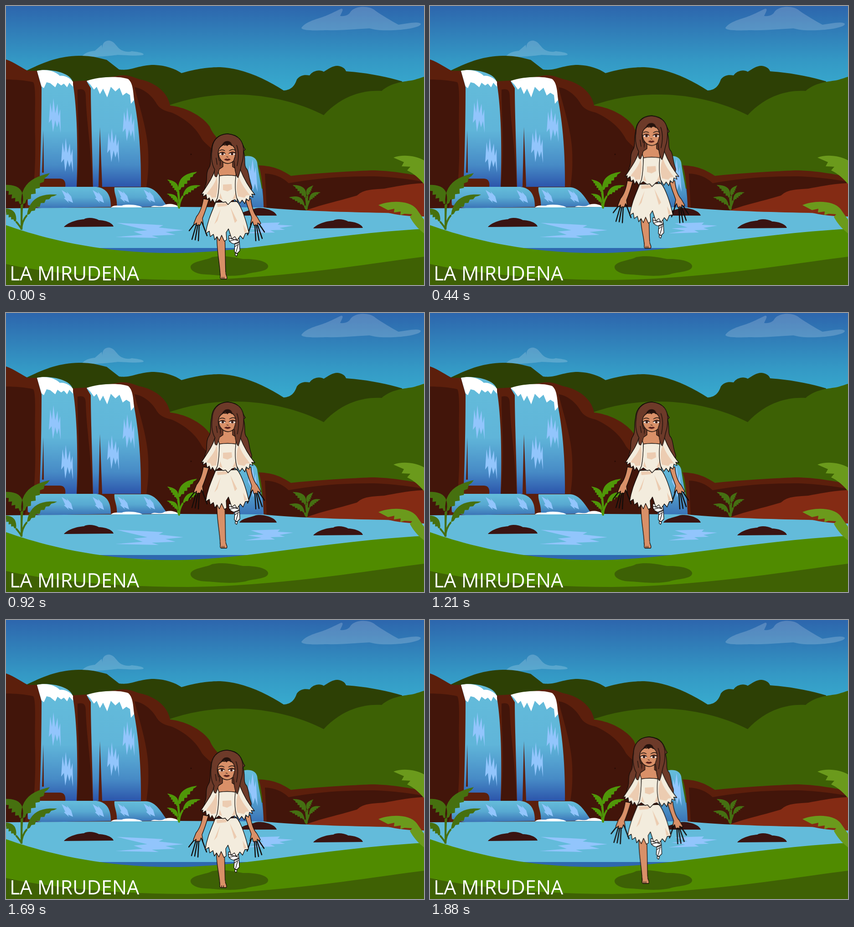
Recreate the animation shown at these times as an HTML page. Size 917 px wide and 611 px high, loop 1.92 s.

```html
<!DOCTYPE html>
<html lang="es">
<head>
<meta charset="utf-8">
<title>La Mirudena</title>
<style>
html, body { margin: 0; width: 100%; height: 100%; overflow: hidden; background: #2e68ae; }
svg { display: block; width: 100vw; height: 100vh; }
.brown { fill: #5c1f0c; }
.dark { fill: #42150a; }
.foam { fill: #fff; }
.glint { fill: #92c5fc; }
.stone { fill: #3a1412; }
.ink { stroke: #130d0a; stroke-width: 1.3; stroke-linejoin: round; stroke-linecap: round; }
.skin { fill: #d99068; }
.hair { fill: #6d3a29; }
.cloth { fill: #f3ecdd; }
.fold { fill: #ecccb1; }
.line { fill: none; }
.title { font: 43px "Open Sans", sans-serif; fill: #fff; }
</style>
</head>
<body>
<svg viewBox="0 0 917 611" preserveAspectRatio="none">
  <defs>
    <linearGradient id="sky" x2="0" y2="1">
      <stop stop-color="#2d66ad"/><stop offset=".55" stop-color="#3499c5"/><stop offset="1" stop-color="#3ab4d3"/>
    </linearGradient>
    <linearGradient id="fall" gradientUnits="userSpaceOnUse" x1="0" y1="170" x2="0" y2="398">
      <stop stop-color="#63bbda"/><stop offset=".45" stop-color="#60b5d9"/><stop offset=".78" stop-color="#478bc6"/><stop offset="1" stop-color="#2b53aa"/>
    </linearGradient>
    <linearGradient id="pool" x2="0" y2="1">
      <stop stop-color="#65bddb"/><stop offset=".5" stop-color="#58a9d1"/><stop offset="1" stop-color="#3a73b7"/>
    </linearGradient>
    <path id="streak" d="M0 54L3 9 7 32 10 0 14 33 19 12 21 39 25 24 26 76 22 50 18 64 14 48 9 74 6 46Z"/>
    <path id="splash" d="M0 0L13 8 11 3 21 14 25 28 14 23 16 28 5 18 8 17Z"/>
    <path id="boulder" d="M127 484C134 475 154 468 171 467 179 462 194 464 204 469 216 469 233 474 236 483Z"/>
  </defs>

  <rect width="917" height="220" fill="url(#sky)"/>
  <g fill="#fff" fill-opacity=".19">
    <path d="M648 48C656 36 676 30 692 25 708 20 728 9 735 6 743 5 735 16 733 22 745 23 752 19 755 14 764-1 797-2 810 10 824 20 846 33 861 41 880 38 905 33 910 39 911 46 880 52 850 53 820 54 815 53 797 49 770 50 740 54 700 53 675 54 650 54 648 48Z"/>
    <path d="M166 111C173 102 184 99 195 98L210 85 212 95C209 80 220 74 228 76 240 79 242 90 252 96 262 101 270 101 276 99 285 100 301 102 302 106 300 110 270 108 245 107 225 110 180 113 166 111Z"/>
  </g>

  <path fill="#2d4005" d="M46 141C90 120 118 110 160 109 190 109 205 114 221 118L248 139C275 143 290 129 325 129 350 130 370 137 385 147 420 137 445 134 470 134 520 136 570 160 609 185 628 184 634 172 638 161 645 151 656 150 666 152 672 142 688 138 697 144 707 138 716 131 727 131 738 132 744 137 746 143 790 146 835 155 869 165V260H46Z"/>
  <path fill="#3d6105" d="M350 220C400 202 450 194 495 194 570 193 640 210 697 239 730 203 775 183 824 186 845 168 870 166 890 163 900 161 910 157 917 155V400H350Z"/>

  <path class="brown" d="M0 117C20 124 35 136 48 142H70L147 165 180 163 245 153C270 148 285 160 300 162 330 170 355 190 360 218 395 222 430 240 447 264 455 285 475 303 515 330L570 445H0Z"/>
  <path class="dark" d="M0 161C20 161 45 163 60 167 67 180 62 230 64 290 65 330 63 360 62 379L110 379 130 397 55 398 40 445H0ZM157 183C170 181 175 183 175 200 178 270 186 300 190 396H155C165 300 156 240 157 183ZM282 178C300 180 320 195 331 215 340 228 352 230 365 234 400 250 420 272 430 292 442 307 460 318 475 330L560 442H340C333 420 325 400 308 396 312 370 313 350 312 320 310 270 291 215 282 178Z"/>
  <path class="brown" d="M74 379H118C128 379 133 389 128 397H58ZM213 394C230 390 241 398 236 409L243 440H226Z"/>
  <circle cx="406" cy="325" r="1.4" fill="#250b05"/>

  <path fill="url(#fall)" d="M68 142C95 136 140 145 146 165 156 220 158 310 155 396H130C132 382 125 378 118 378H74C77 300 78 230 78 178ZM177 165C200 155 265 150 277 185 287 230 297 300 296 396H191C190 340 186 230 186 180Z"/>
  <path class="brown" d="M82 272L83 365 79 365ZM206 265L211 396H203Z"/>
  <path class="foam" d="M68 142C90 137 108 143 118 153 130 151 143 160 147 166L147 177 139 168 134 178 127 170 121 174 113 168 108 178 97 169 89 167 83 180 78 176ZM177 164C205 154 250 153 268 160 278 168 279 185 281 206L274 214 272 195 264 190 256 196 249 179 240 187 230 177 222 200 213 181 206 193 199 177 193 183 185 172Z"/>
  <g class="glint">
    <use href="#streak" x="94" y="202"/><use href="#streak" x="121" y="289"/>
    <use href="#streak" x="222" y="268"/><use href="#streak" x="256" y="222"/>
  </g>
  <path fill="url(#pool)" d="M60 396H198C222 399 230 415 230 440L78 443 48 436C46 415 52 400 60 396Z"/>
  <path fill="url(#pool)" d="M238 397H308C330 399 340 420 354 439L243 441C245 420 236 410 238 397Z"/>
  <g class="glint">
    <use href="#splash" x="122" y="403"/><use href="#splash" x="190" y="403"/>
    <use href="#splash" x="245" y="402"/><use href="#splash" x="302" y="402"/>
  </g>

  <path fill="url(#pool)" d="M500 343C510 328 545 320 551 342 556 380 566 415 566 442H500Z"/>
  <path class="glint" d="M531 370L534 348 537 362 541 335 545 366 548 352 552 407 546 389 542 404 537 381Z"/>
  <path class="brown" d="M554 349C580 350 600 355 625 372 690 365 760 362 800 360 850 360 890 370 917 373V455H566C564 410 562 370 554 349Z"/>
  <path class="dark" d="M568 367C590 368 605 374 620 388 680 377 740 373 800 373 840 373 890 380 917 385V430L660 449 572 445Z"/>
  <path fill="#842b14" d="M655 449C690 435 720 430 770 415 780 407 785 402 830 400 870 392 900 388 917 388V459L820 455Z"/>
  <path fill="#63bbda" d="M0 443L380 440 565 441C610 447 720 451 830 453L917 456V530H0Z"/>
  <path fill="#842b14" d="M835 452Q875 448 917 450V461Q870 461 835 452Z"/>
  <path class="foam" d="M230 441C240 433 250 440 257 436 273 433 295 437 299 441ZM318 440C327 434 335 441 345 437 352 433 366 431 380 440Z"/>
  <path class="glint" d="M243 475L310 478 345 480 335 485 389 491 350 495 372 501 320 503 335 508 240 506 300 501 280 494 310 491ZM537 476L601 474 596 479 630 481 600 486 612 490 580 491 590 496 523 498 560 492 530 487 565 485Z"/>
  <g class="stone">
    <use href="#boulder"/><use href="#boulder" x="547" y="3"/>
    <path d="M512 459C516 450 538 447 548 443 560 440 590 446 594 459Z"/>
  </g>

  <path fill="#508b00" d="M0 480C100 515 220 541 365 541 520 541 680 502 917 488V611H0Z"/>
  <path fill="#3f6104" d="M0 565C100 587 250 600 400 600 600 598 790 565 917 549V611H0Z"/>
  <path fill="#3d6105" d="M405 570C410 558 440 557 452 550 475 545 500 550 520 554 550 553 577 560 575 571 573 583 540 582 525 588 490 594 465 589 440 588 420 588 403 580 405 570Z"/>
  <g id="plants"></g>
  <g fill="#6b9a1c">
    <path d="M850 332C870 324 900 328 917 338V390C906 377 895 367 880 360L887 352 868 351 873 342Z"/>
    <path d="M817 436C840 426 885 424 901 445L917 468V498C904 488 893 475 886 462L891 456 874 455 865 458 866 450 851 452 852 444 838 447Z"/>
  </g>

  <g id="body">
    <path class="hair ink" d="M487 280C466 280 452 294 451 314 447 330 451 345 446 353 436 368 444 381 437 394 435 402 440 407 444 408H528C538 406 541 401 538 393 533 380 534 368 529 358 520 350 527 335 521 318L525 314C518 308 520 283 487 280Z"/>
    <g id="leg"><path class="skin ink" d="M463 500C461 530 468 555 470 589H482C481 560 481 530 480 500Z"/></g>
    <g id="foot">
      <path class="skin ink" d="M470 586C471 591 468 597 472 598H484C487 595 483 590 482 586"/>
      <path class="skin" d="M470.700 583H481.500V589H470.700Z"/>
      <path class="ink line" d="M474 597V594M478 597V594"/>
    </g>
    <path class="foam ink" d="M489 503L510 503 512 515C509 522 500 522 495 519 489 516 488 510 489 503ZM502 520L512 516 513 536 507 542 501 538ZM503 541L508 543 506 548 503 546Z"/>
    <path class="ink line" d="M489 508L510 514M490 515L511 509M502 527L511 521M505 538L509 524"/>

    <path class="ink line" stroke-width="2" d="M416 474L402 492M418 477L408 511M421 478L415 512M424 478L422 514M429 471L441 503M553 474L567 495M551 477L562 509M549 478L555 513M546 478L548 514M540 472L530 501" style="stroke-width:2.4"/>
    <path class="skin ink" d="M433 422C430 442 424 454 418 461L412 476 414 479 418 475 418 481 422 479 426 480 429 472 433 479 431 465C436 453 441 438 445 424ZM526 426C531 444 536 454 539 464L536 479 541 472 544 481 548 479 552 481 552 475 557 478 559 476 551 462C545 456 539 442 537 422Z"/>

    <path class="skin ink" d="M476 340V352L464 360V374H507V358L497 352V340Z"/>
    <path class="cloth ink" d="M460 430C452 450 442 470 438 498L446 493 448 505 455 500 458 512 463 505 468 514 473 502 479 515 484 512 483 496 488 488 492 500 495 510 502 505 507 513 514 503 520 510 525 498 533 497C527 470 517 440 507 428Z"/>
    <path class="fold" d="M463 433L488 431 484 438 464 440ZM471 444L457 478 464 470ZM492 440L507 470 502 475ZM520 478L529 494 523 496Z"/>
    <path class="cloth ink" d="M468 372Q486 369 505 372C508 390 503 405 508 430L502 424 496 426 487 435 482 429 476 430 468 424 460 430C467 410 467 390 468 372Z"/>
    <path class="fold" d="M476 391L495 390 496 401 486 406 476 403ZM470 410L475 424 468 421ZM504 407L505 422 497 423Z"/>
    <path class="cloth ink" d="M458 359C453 377 443 390 428 413L433 411 432 418 439 413 441 424 446 420 449 430 453 423 458 432 464 420C468 400 468 380 468 371L463 356ZM506 354L514 358C521 376 531 395 546 413L539 412 542 419 535 416 533 427 527 422 524 433 518 425 513 432 506 420C501 400 503 380 506 354Z"/>
    <path class="fold" d="M462 374C459 391 445 403 440 412L448 414 451 420 461 419C465 399 465 386 462 374ZM511 373C515 389 526 402 535 414L527 415 523 420 509 417C504 401 506 385 511 373Z"/>

    <g id="head">
      <path class="hair ink" d="M486 280C463 281 452 297 452 317 449 334 453 350 458 358 455 369 459 375 462 374 468 360 471 345 470 335L500 338C502 355 503 371 509 376 514 364 515 350 518 342 522 330 520 321 521 317 521 300 515 283 486 280Z"/>
      <ellipse class="skin ink" cx="463" cy="325" rx="3" ry="6"/>
      <path class="skin ink" d="M466 322C464 312 472 307 477 304 482 307 489 301 493 304 501 307 506 315 505 327 503 337 496 345 486 345 475 344 467 335 466 322Z"/>
      <path fill="#25120d" d="M473 306C476 298 482 295 488 296 493 297 497 302 495 307L490 302 485 307 481 302Z"/>
      <path class="hair" d="M479 302C464 308 463 324 468 339L470 353 463 366 458 348 459 315ZM493 302C505 310 506 322 500 337L504 354 509 369 515 340 513 310Z"/>
      <path class="ink line" d="M478 303C462 310 464 326 468 339M494 303C505 311 506 322 500 337M461 333L463 347M506 305Q513 322 507 350"/>
      <path fill="#9c5339" d="M468 322Q474 316 481 321L480 325H468ZM489 322Q497 315 503 321L502 325H490Z"/>
      <path fill="#fff" d="M468 324Q474 319 481 324 475 330 468 324ZM489 324Q496 319 503 324 496 330 489 324Z"/>
      <g fill="#3a1b14"><circle cx="475" cy="324" r="2.800"/><circle cx="496" cy="324" r="2.800"/></g>
      <path class="ink line" d="M467 323Q474 318 481 323M489 323Q496 318 504 322M468 317Q474 313 480 317M490 317Q497 312 503 316M484 330L487 331"/>
      <path fill="#5a211c" d="M478 336L483 334 486 335 489 334 493 336Q486 342 478 336Z"/>
    </g>
  </g>

  <text class="title" x="8" y="601">LA MIRUDENA</text>
</svg>
<script>
// A leaf follows a bent midrib; its lower edge is torn into teeth.
function leafPath([x0, y0, x1, y1, bend, width]) {
  const dx = x1 - x0, dy = y1 - y0, len = Math.hypot(dx, dy);
  const nx = -dy / len, ny = dx / len, steps = 12, top = [], bottom = [];
  for (let i = 0; i <= steps; i++) {
    const t = i / steps, arch = 4 * bend * t * (1 - t);
    const half = width * Math.sin(Math.PI * Math.pow(t, 0.8));
    const at = d => `${(x0 + dx * t + nx * d).toFixed(1)} ${(y0 + dy * t + ny * d).toFixed(1)}`;
    const side = Math.sign(bend);
    top.push(at(arch + side * half));
    bottom.unshift(at(arch - side * half * (i % 2 ? 1.15 : 0.6)));
  }
  return `M${top.concat(bottom).join("L")}Z`;
}

function plant(color, x, y, leaves) {
  const stems = leaves.map(([lx, ly]) => `M${x} ${y}Q${x} ${ly + 14} ${lx} ${ly}`).join("");
  return `<path d="${stems}" fill="none" stroke="${color}" stroke-width="4"/>` +
    `<path d="${leaves.map(leafPath).join("")}" fill="${color}"/>`;
}

document.getElementById("plants").innerHTML =
  plant("#46700f", 34, 490, [[34, 435, 96, 366, -8, 13], [36, 434, -10, 392, 8, 13], [46, 458, 112, 413, -10, 9], [22, 472, -12, 444, 6, 8]]) +
  plant("#4f9708", 380, 440, [[378, 404, 419, 363, -6, 8], [377, 408, 354, 380, 4, 6], [388, 416, 427, 393, -5, 6], [377, 432, 353, 411, 4, 5]]) +
  plant("#456f12", 660, 440, [[658, 420, 629, 392, 5, 7], [665, 426, 690, 408, -4, 5], [655, 437, 621, 419, 5, 6], [661, 416, 674, 393, -3, 5]]);

// start ms, body x, body y, head x, leg stretch
const poses = [
  [0, 0, 0, 0, 0],
  [440, 0, -39.5, 0, -28],
  [920, 0, -85, 0.5, 2],
  [1400, -1, 5, -0.5, -17],
  [1880, -4.5, -24, -1, 3],
];
const loop = 1920, hip = 505, legLength = 83;

function hold(id, toTransform) {
  const frames = poses.map(([start, ...pose]) =>
    ({ offset: start / loop, transform: toTransform(...pose), easing: "step-end" }));
  frames.push({ ...frames[frames.length - 1], offset: 1 });
  document.getElementById(id).animate(frames, { duration: loop, iterations: Infinity });
}

hold("body", (x, y) => `translate(${x}px, ${y}px)`);
hold("head", (x, y, headX) => `translate(${headX}px, 0px)`);
hold("leg", (x, y, headX, stretch) =>
  `translate(0px, ${hip}px) scale(1, ${1 + stretch / legLength}) translate(0px, ${-hip}px)`);
hold("foot", (x, y, headX, stretch) => `translate(0px, ${stretch}px)`);
</script>
</body>
</html>
```
